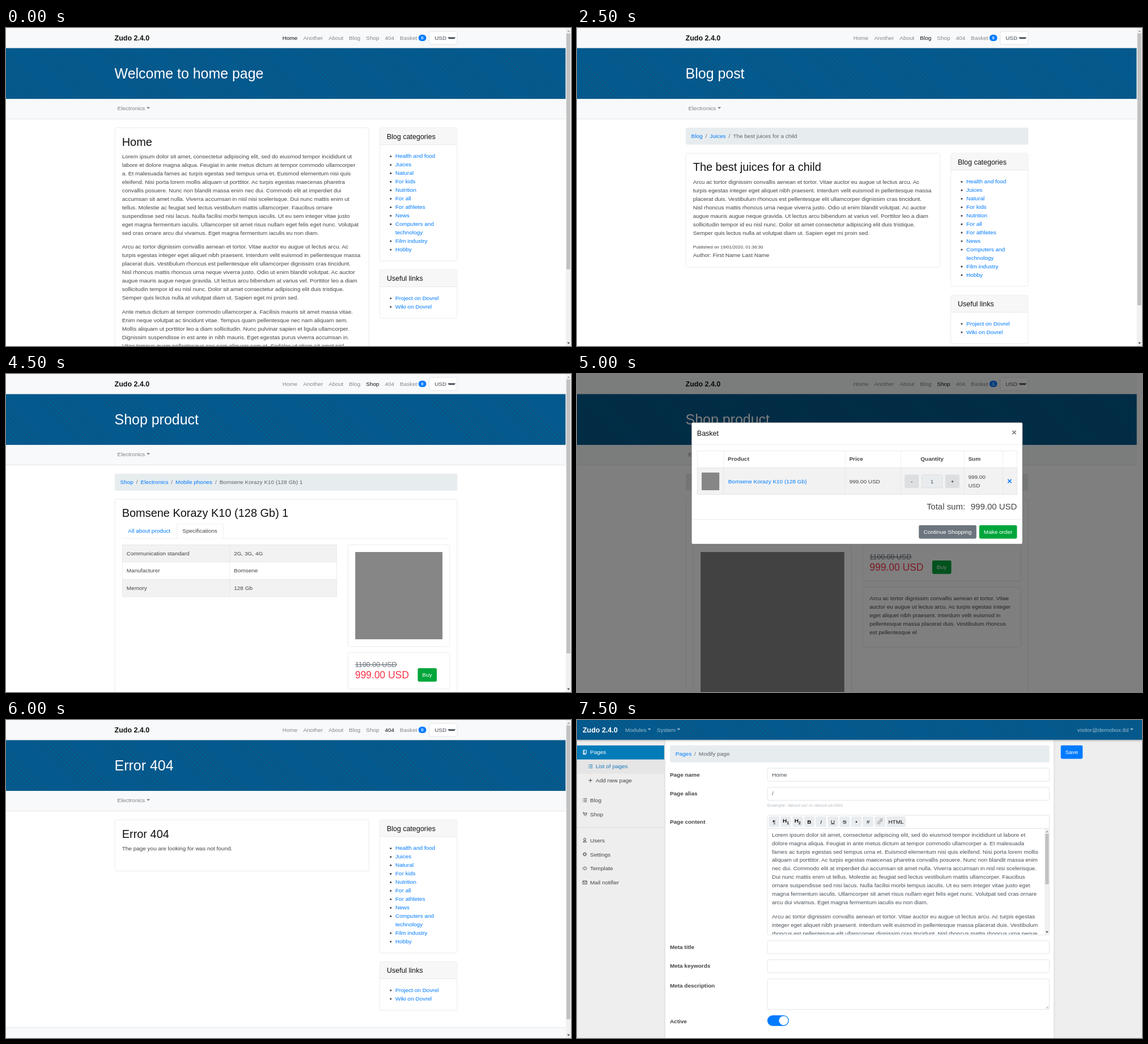
Animation, 997 px wide and 561 px high, one loop 8000 ms. Source, as an HTML page:

```html
<!DOCTYPE html>
<html lang="en">
<head>
<meta charset="utf-8">
<title>Site tour</title>
<style>
html, body { margin: 0; width: 100%; height: 100%; overflow: hidden; background: #fff; }
#stage { position: absolute; left: 0; top: 0; width: 1600px; height: 901px; overflow: hidden; transform: scale(.623125); transform-origin: 0 0; font: 16px/1.5 "Liberation Sans", Arial, sans-serif; color: #444; }
#stage * { box-sizing: border-box; }
.scene { position: absolute; inset: 0; overflow: hidden; background: #fff; visibility: hidden; animation: show 8s step-end infinite; }
@keyframes show { 0% { visibility: visible; } 6.25%, 100% { visibility: hidden; } }
.b, .t { position: absolute; }
.t { margin: 0; white-space: nowrap; transform: translateY(-50%); }
h2 { margin: 0 0 11px; font: 32px/38.4px "Liberation Sans", Arial, sans-serif; color: #111; white-space: nowrap; }
a { color: #007bff; }
.stripes { background: repeating-linear-gradient(45deg, #005c90 0 6px, #0d5385 6px 9px); }
.caret { display: inline-block; margin-left: 4px; vertical-align: 4px; border: 5px solid transparent; border-top-color: currentColor; border-bottom: 0; }
.nav { display: flex; justify-content: flex-end; align-items: center; color: #868788; }
.nav span { padding: 0 8px; white-space: nowrap; }
.nav .on { color: #111; }
.nav i { display: inline-block; margin-left: 4px; padding: 3px 7.2px; border-radius: 10px; background: #007bff; color: #fff; font: bold 12px/12px "Liberation Sans", Arial, sans-serif; vertical-align: 1px; }
.select { position: relative; width: 80px; height: 38px; padding: 6px 15px; border: 1px solid #ced4da; border-radius: 4px; background: #fff; color: #495057; }
.select .caret { position: absolute; right: 4px; top: 16px; border-width: 5px 3.5px 0; }
.card { border: 1px solid #dfdfdf; border-radius: 4px; background: #fff; }
.card h5 { margin: 0; height: 48px; padding: 12px 20px; border-bottom: 1px solid #dfdfdf; background: #f7f7f7; font: 20px/24px "Liberation Sans", Arial, sans-serif; color: #111; }
.card ul { margin: 0; padding: 20px 20px 20px 44px; }
.side { width: 220px; }
.side .card { margin-bottom: 24px; }
.text { padding: 20px; white-space: nowrap; }
.text p { margin: 0 0 16px; }
.text small { display: block; font-size: 12.8px; line-height: 24px; }
.post { margin-bottom: 40px; }
.crumbs { padding: 12px 16px; border-radius: 4px; background: #e7ecef; color: #5c646b; white-space: nowrap; }
.crumbs s { padding: 0 8px; text-decoration: none; color: #6c757d; }
.btn { display: flex; align-items: center; justify-content: center; border-radius: 4px; color: #fff; white-space: nowrap; }
.field { border: 1px solid #ced4da; border-radius: 4px; background: #fff; padding: 6px 12px; color: #495057; }
.focus { border-color: #80bdff; box-shadow: 0 0 0 3px #bfdeff; }
.area::after { content: ""; position: absolute; right: 2px; bottom: 2px; width: 9px; height: 9px; background: repeating-linear-gradient(135deg, transparent 0 2px, #888 2px 3px); clip-path: polygon(100% 0, 100% 100%, 0 100%); }
svg { fill: none; stroke: currentColor; stroke-width: 1.8; }
</style>
</head>
<body>
<div id="stage"></div>
<script>
const GREEN = '#00a63b', BLUE = '#007bff', GREY = '#868686', RED = '#fb3449', LINE = '#dee2e6';
const BRAND = 'Zudo 2.4.0', PHONE = 'Bomsene Korazy K10';

// "/" ends a line in the site column, "~" in the editor.
const COPY = [
  'Lorem ipsum dolor sit amet, consectetur adipiscing elit, sed do eiusmod tempor incididunt ut/labore et~dolore magna aliqua. Feugiat in ante metus dictum at tempor commodo ullamcorper/a. Et malesuada~fames ac turpis egestas sed tempus urna et. Euismod elementum nisi quis/eleifend. Nisi porta lorem mollis~aliquam ut porttitor. Ac turpis egestas maecenas pharetra/convallis posuere. Nunc non blandit massa enim~nec dui. Commodo elit at imperdiet dui/accumsan sit amet nulla. Viverra accumsan in nisl nisi scelerisque.~Dui nunc mattis enim ut/tellus. Molestie ac feugiat sed lectus vestibulum mattis ullamcorper. Faucibus~ornare/suspendisse sed nisi lacus. Nulla facilisi morbi tempus iaculis. Ut eu sem integer vitae justo/eget~magna fermentum iaculis. Ullamcorper sit amet risus nullam eget felis eget nunc. Volutpat/sed cras ornare~arcu dui vivamus. Eget magna fermentum iaculis eu non diam.',
  'Arcu ac tortor dignissim convallis aenean et tortor. Vitae auctor eu augue ut lectus arcu. Ac/turpis egestas~integer eget aliquet nibh praesent. Interdum velit euismod in pellentesque massa/placerat duis. Vestibulum~rhoncus est pellentesque elit ullamcorper dignissim cras tincidunt./Nisl rhoncus mattis rhoncus urna neque~viverra justo. Odio ut enim blandit volutpat. Ac auctor/augue mauris augue neque gravida. Ut lectus arcu bibendum at varius vel. Porttitor leo a diam/sollicitudin tempor id eu nisl nunc. Dolor sit amet consectetur adipiscing elit duis tristique./Semper quis lectus nulla at volutpat diam ut. Sapien eget mi proin sed.',
  'Ante metus dictum at tempor commodo ullamcorper a. Facilisis mauris sit amet massa vitae./Enim neque volutpat ac tincidunt vitae. Tempus quam pellentesque nec nam aliquam sem./Mollis aliquam ut porttitor leo a diam sollicitudin. Nunc pulvinar sapien et ligula ullamcorper./Dignissim suspendisse in est ante in nibh mauris. Eget egestas purus viverra accumsan in./Vitae tempus quam pellentesque nec nam aliquam sem et. Sodales ut etiam sit amet nisl.'
];
const para = (i, end = '/') =>
  '<p>' + COPY[i].replace(/[/~]/g, c => c === end ? '<br>' : ' ') + '</p>';

const t = (x, y, s, css = '') => `<p class="t" style="left:${x}px;top:${y}px;${css}">${s}</p>`;
const box = (x, y, w, h, css = '', s = '', cls = '') =>
  `<div class="b ${cls}" style="left:${x}px;top:${y}px;width:${w}px;height:${h}px;${css}">${s}</div>`;
const btn = (x, y, w, h, color, s) => box(x, y, w, h, 'background:' + color, s, 'btn');
const field = (x, y, w, h = 38, s = '', cls = '') => box(x, y, w, h, '', s, 'field ' + cls);
const link = s => `<a>${s}</a>`;
const caret = '<span class="caret"></span>';
const arrow = (x, y, up, c) => box(x, y, 0, 0,
  `border:4px solid transparent;border-${up ? 'bottom' : 'top'}:5px solid ${c};border-${up ? 'top' : 'bottom'}:0`);
const crumbs = list => list.map((s, i) => i < list.length - 1 ? link(s) + '<s>/</s>' : s).join('');

const list = (title, items) =>
  `<div class="card"><h5>${title}</h5><ul>${items.map(s => `<li>${link(s)}</li>`).join('')}</ul></div>`;
const side = list('Blog categories', ['Health and food', 'Juices', 'Natural', 'For kids', 'Nutrition',
  'For all', 'For athletes', 'News', 'Computers and technology', 'Film industry', 'Hobby']) +
  list('Useful links', ['Project on Dovrel', 'Wiki on Dovrel']);

const scrollbar = thumb => box(1585, 0, 15, 901, 'background:#f1f1f1',
  box(2, 15, 11, thumb, 'background:#c1c1c1') + arrow(4, 6, true, '#a3a3a3') + arrow(4, 890, false, '#505050'));

function site({ on, title, path, body, thumb, basket = 0, footer, modal = '' }) {
  const w = thumb || modal ? 1585 : 1600, x = (w - 970) / 2;
  const links = ['Home', 'Another', 'About', 'Blog', 'Shop', '404'].map(s =>
    `<span class="${s === on ? 'on' : ''}">${s}</span>`).join('');
  return box(0, 0, w, 57, 'background:#f8f9fa;border-bottom:1px solid #dcdddd') +
    t(x, 28, BRAND, 'font-weight:bold;font-size:20px;color:#111') +
    box(x, 0, 970, 56, '', `${links}<span>Basket<i>${basket}</i></span><div class="select">USD${caret}</div>`, 'nav') +
    box(0, 57, w, 144, '', '', 'stripes') +
    t(x, 129, title, 'font-size:40px;color:#fff') +
    box(0, 201, w, 57, 'background:#f8f9fa;border-bottom:1px solid #d8d9da') +
    t(x + 8, 228, 'Electronics' + caret, 'color:#808182') +
    (path ? box(x, 282, 970, 48, '', crumbs(path), 'crumbs') : '') +
    box(x, path ? 354 : 282, 970, 0, '', body) +
    (footer ? box(0, footer, w, 72, 'background:#f8f9fa;border-top:1px solid #dcdddd;padding-top:24px;text-align:center;color:#111', 'Your Website © 2019-2020') : '') +
    (thumb ? scrollbar(thumb) : '') + modal;
}

const columns = (html, h) => box(0, 0, 720, h, '', html, 'card text') + box(750, 0, 220, 0, '', side, 'side');

const page = name => site({
  on: name, title: `Welcome to ${name.toLowerCase()} page`, thumb: 668,
  body: columns(`<h2>${name}</h2>` + para(0) + para(1) + para(2), 900)
});

const post = (title, time, linked = true) =>
  `<div class="post"><h2>${linked ? link(title) : title}</h2>${para(1)}<small>Published on 19/01/2020, ${time}</small>Author: First Name Last Name</div>`;
const juices = 'The best juices for a child';

const product = box(250, 0, 241, 429, 'border:1px solid #dfdfdf',
  box(20, 20, 200, 199, 'background:' + GREY) +
  t(20, 248, link(PHONE)) +
  box(20, 270, 210, 64, 'font-size:11.2px;line-height:16px;white-space:nowrap',
    'Arcu ac tortor dignissim convallis<br>aenean et tortor. Vitae auctor eu augue<br>ut lectus arcu. Ac turpis egestas integer<br>eget aliquet nibh praesent.') +
  t(20, 381, '999.00 USD', `font-weight:bold;color:${RED}`) +
  t(20, 401, '<s>1100.00 USD</s>', 'font-weight:bold;font-size:9.6px;color:#6c757d') +
  btn(159, 369, 61, 38, GREEN, 'View'));
const shop = (title, path, category) => site({
  on: 'Shop', title, path, footer: 829,
  body: box(0, 0, 220, 0, '', list('Shop categories', [category]), 'side') + product
});

const price = (x, y, w) => box(x, y, w, 104, '',
  t(20, 33, '<s>1100.00 USD</s>', 'font-size:20px;color:#6c757d') +
  t(20, 64, '999.00 USD', `font-size:28px;color:${RED}`) + btn(197, 44, 54, 38, GREEN, 'Buy'), 'card');

function item(specs, extra) {
  const tab = (x, w, s, on) => box(x, 70, w, 42,
    on ? `border:1px solid ${LINE};border-bottom-color:#fff;border-radius:4px 4px 0 0;background:#fff` : '') +
    t(x + 17, 91, on ? s : link(s));
  const rows = [['Communication standard', '2G, 3G, 4G'], ['Manufacturer', 'Bomsene'], ['Memory', '128 Gb']];
  const table = rows.map(([a, b], i) =>
    box(21, 129 + i * 49, 608, 50, `border:1px solid ${LINE};background:${i % 2 ? '#fff' : '#f2f2f2'}`) +
    t(34, 154 + i * 49, a) + t(338, 154 + i * 49, b)).join('') + box(325, 129, 1, 148, 'background:' + LINE);
  const picture = (x, w) => box(x, 129, w, w, '', box(20, 20, w - 42, w - 42, 'background:' + GREY), 'card');
  const body = box(0, 0, 970, 900, '', '', 'card') +
    box(21, 21, 900, 40, '', `<h2>${PHONE} (128 Gb) 1</h2>`) +
    box(21, 111, 928, 1, 'background:' + LINE) +
    tab(21, 154, 'All about product', !specs) + tab(175, 133, 'Specifications', specs) +
    (specs ? table + picture(660, 289) + price(660, 434, 289)
      : picture(21, 449) + price(500, 129, 449) +
        box(500, 249, 449, 170, 'padding:20px', COPY[1].replace(/[/~]/g, ' ').slice(0, 243), 'card'));
  return site({
    on: 'Shop', title: 'Shop product', thumb: specs ? 776 : 640, body,
    path: ['Shop', 'Electronics', 'Mobile phones', PHONE + ' (128 Gb) 1'], ...extra
  });
}

function basket(form) {
  const end = form ? 693 : 411, bold = 'font-weight:bold';
  const cols = [340, 415, 759, 916, 1096, 1206, 1246];
  const heads = [[427, 'Product'], [771, 'Price'], [973, 'Quantity'], [1108, 'Sum']];
  const labels = [['Last Name', 'Mobile Phone'], ['First Name', 'Email Address'], ['Middle Name', 'Delivery']];
  const rows = labels.map(([a, b], i) => {
    const y = 435 + i * 54.5;
    return t(340, y + 19, a, bold) + field(495, y, 283, 38, '', i ? '' : 'focus') +
      t(808, y + 19, b, bold) + field(963, y, 283);
  }).join('');
  return item(false, {
    thumb: 0, basket: 1,
    modal: box(0, 0, 1600, 901, 'background:rgba(0,0,0,.5)') +
      box(324, 137, 938, end + 71 - 137, 'background:#fff;border:1px solid #777;border-radius:4px') +
      t(340, 168, 'Basket', 'font-size:20px;color:#111') + t(1231, 165, '×', 'font-weight:bold;font-size:24px;color:#777') +
      box(325, 199, 936, 1, 'background:' + LINE) +
      box(340, 217, 907, 125, `border:1px solid ${LINE}`) +
      box(340, 265, 907, 77, `border:1px solid ${LINE};border-top-width:2px;background:#f2f2f2`) +
      cols.slice(1, 6).map(x => box(x, 217, 1, 125, 'background:' + LINE)).join('') +
      heads.map(([x, s]) => t(x, 241, s, bold)).join('') +
      box(353, 279, 50, 50, 'background:' + GREY) + t(428, 304, link(PHONE + ' (128 Gb)')) +
      t(771, 304, '999.00 USD') + t(1108, 304, '999.00<br>USD') +
      btn(928, 285, 40, 38, '#dcdedf;color:#222', '-') + btn(1043, 285, 40, 38, '#dcdedf;color:#222', '+') +
      box(976, 285, 59, 38, 'background:#e9ecef;text-align:center', '1', 'field') +
      t(1218, 304, '×', `font-weight:bold;font-size:24px;color:${BLUE}`) +
      t(990, 376, 'Total sum:', 'font-size:24px') + t(1115, 376, '999.00 USD', 'font-size:24px') +
      (form ? box(340, 411, 907, 1, 'background:' + LINE) + rows + box(508, 445, 1, 18, 'background:#333') +
        field(340, 599, 907, 62, '', 'area') : '') +
      box(325, end, 936, 1, 'background:' + LINE) +
      btn(968, end + 17, 163, 38, '#6c757d', 'Continue Shopping') + btn(1139, end + 17, 107, 38, GREEN, 'Make order')
  });
}

const login = box(0, 0, 1600, 901, 'background:#eee') +
  box(633, 304, 335, 293, 'background:#fff;border:1px solid #dfdfdf') +
  box(633, 324, 335, 42, 'text-align:center;font-size:28px;color:#222', 'Please login') +
  box(658, 378, 286, 83, '', '', 'field') + box(658, 419, 286, 1, 'background:#ced4da') +
  t(667, 398, 'User email', 'color:#6c757d') + t(667, 439, 'User password', 'color:#6c757d') +
  btn(658, 477, 286, 47, '#0079f4;font-size:20px', 'Login') +
  box(633, 548, 335, 24, 'text-align:center', link('← Back to website'));

const ICONS = {
  book: 'M3 1.5h10v11H3zM3 12v3h9M6 2v10', list: 'M1 3h2M5 3h10M1 8h2M5 8h10M1 13h2M5 13h10',
  plus: 'M8 2v12M2 8h12', cart: 'M1 2h3l2 8h7l2-6H5M6 14h1M12 14h1',
  user: 'M8 2a3 3 0 0 1 0 7a3 3 0 0 1 0-7M3 15q0-5 5-5t5 5z', gear: 'M8 4a4 4 0 0 1 0 8a4 4 0 0 1 0-8M8 1v3M8 12v3M1 8h3M12 8h3M3 3l2 2M11 11l2 2M13 3l-2 2M5 11l-2 2',
  eye: 'M1 8q7-10 14 0q-7 10-14 0M8 7v2', mail: 'M1.5 3h13v10h-13zM2 4l6 5l6-5'
};

function admin(body, wide) {
  const row = (x, y, icon, s, css = '') => box(x, y - 8, 16, 16, css,
    `<svg width="14" height="14" viewBox="0 0 16 16" style="display:block"><path d="${ICONS[icon]}"/></svg>`) + t(x + 22, y, s, css);
  const rest = [['list', 'Blog', 228], ['cart', 'Shop', 268], ['user', 'Users', 341],
    ['gear', 'Settings', 381], ['eye', 'Template', 421], ['mail', 'Mail notifier', 461]];
  const dim = 'color:rgba(255,255,255,.6)', shade = 'background:#eee;box-shadow:0 0 6px rgba(0,0,0,.3)';
  return box(0, 56, 247, 850, shade) + (wide ? '' : box(1353, 56, 260, 850, shade)) +
    box(0, 0, 1600, 56, 'box-shadow:0 0 7px rgba(0,0,0,.5)', '', 'stripes') +
    t(16, 28, BRAND, 'font-weight:bold;font-size:20px;color:#fff') +
    t(136, 28, 'Modules' + caret, dim) + t(226, 28, 'System' + caret, dim) +
    `<p class="t" style="right:24px;top:28px;${dim}">visitor@demobox.tld${caret}</p>` +
    box(0, 72, 247, 40, 'background:#047bb9') + box(0, 112, 247, 40, 'background:#e5e5e5') +
    row(15, 92, 'book', 'Pages', 'color:#fff') + row(31, 132, 'list', 'List of pages', 'color:#1578b8') +
    row(31, 172, 'plus', 'Add new page') + box(0, 304, 247, 1, 'background:#d2d2d2') +
    rest.map(([icon, s, y]) => row(15, y, icon, s)).join('') + body;
}

const pageList = () => admin(
  box(263, 72, 1321, 48, '', crumbs(['Pages', 'List of pages']), 'crumbs') +
  ['Page', 'Home', 'Another', 'About'].map((s, i) => {
    const y = 136 + i * 49, css = i ? '' : 'font-weight:bold';
    return box(263, y, 1321, 50, `border:1px solid ${LINE};background:${i % 2 ? '#f2f2f2' : '#fff'}`) +
      t(276, y + 25, i ? link(s) : s, css) +
      t(1090, y + 25, i ? '19/01/2020, 01:36:30' : 'Date/Time', css) + t(1380, y + 25, i ? 'Yes' : 'Active', css);
  }).join(''), true);

function pageEdit() {
  const labels = [['Page name', 155], ['Page alias', 209], ['Page content', 288], ['Meta title', 643],
    ['Meta keywords', 697], ['Meta description', 752], ['Active', 854]];
  const chain = '<svg width="20" height="20" viewBox="0 0 20 20" style="color:#999"><path d="M8 12l5-5M9 6l3-3q3-1 5 2q0 2-5 6M11 14l-3 3q-4 1-5-3q1-2 5-5"/></svg>';
  const tools = ['¶', '<b>H<sub>1</sub></b>', '<b>H<sub>2</sub></b>', '<b>B</b>', '<i>I</i>', '<u>U</u>', '<s>S</s>', '•', '#', chain, 'HTML'];
  return admin(
    box(263, 72, 1075, 48, '', crumbs(['Pages', 'Modify page']), 'crumbs') +
    labels.map(([s, y]) => t(263, y, s, 'font-weight:bold')).join('') +
    field(539, 136, 799, 38, 'Home') + field(539, 190, 799, 38, '/') +
    t(539, 241, 'Example: /about-us/ or /about-us.html', 'font-size:12.8px;color:#b6bcc2') +
    box(539, 269, 799, 340, 'padding:0', '', 'field') + box(540, 307, 797, 1, 'background:#ced4da') +
    tools.map((s, i) => btn(543 + i * 33.3, 273, i < 10 ? 30 : 55, 30, '#e9ecef;color:#111;line-height:1',
      `<span>${s.replace('<sub>', '<sub style="font-size:11px">')}</span>`)).join('') +
    box(540, 308, 784, 299, 'overflow:hidden;padding:5px 12px;color:#495057', para(0, '~') + para(1, '~'), 'text') +
    box(1324, 308, 13, 300, 'background:#f1f1f1',
      box(2, 14, 10, 143, 'background:#c1c1c1') + arrow(3, 5, true, '#a3a3a3') + arrow(3, 290, false, '#505050')) +
    field(539, 624, 799) + field(539, 678, 799) + field(539, 733, 799, 87, '', 'area') +
    box(539, 836, 61, 30, `border-radius:15px;background:${BLUE}`,
      box(33, 2, 26, 26, 'border-radius:50%;background:#fff')) +
    btn(1370, 72, 62, 38, BLUE, 'Save'));
}

const scenes = [
  page('Home'), page('Another'), page('About'),
  site({ on: 'Blog', title: 'Blog', path: ['Blog'], thumb: 553,
    body: columns(post(juices, '01:36:30') + post('Latest top space movies', '01:36:10'), 900) }),
  site({ on: 'Blog', title: 'Blog category', path: ['Blog', 'Juices'], thumb: 640,
    body: columns(post(juices, '01:36:30') + post('Natural juices every day', '01:35:50'), 900) }),
  site({ on: 'Blog', title: 'Blog post', path: ['Blog', 'Juices', juices], thumb: 770,
    body: columns(post(juices, '01:36:30', false), 324) }),
  shop('Shop', ['Shop'], 'Electronics'),
  shop('Shop category', ['Shop', 'Electronics'], 'Mobile phones'),
  item(false), item(true), basket(false), basket(true),
  site({ on: '404', title: 'Error 404', thumb: 832, footer: 870,
    body: columns('<h2>Error 404</h2><p>The page you are looking for was not found.</p>', 146) }),
  login, pageList(), pageEdit()
];

document.getElementById('stage').innerHTML = scenes.map((html, i) =>
  `<div class="scene" style="animation-delay:${(i - scenes.length) * .5}s">${html}</div>`).join('');
</script>
</body>
</html>
```
